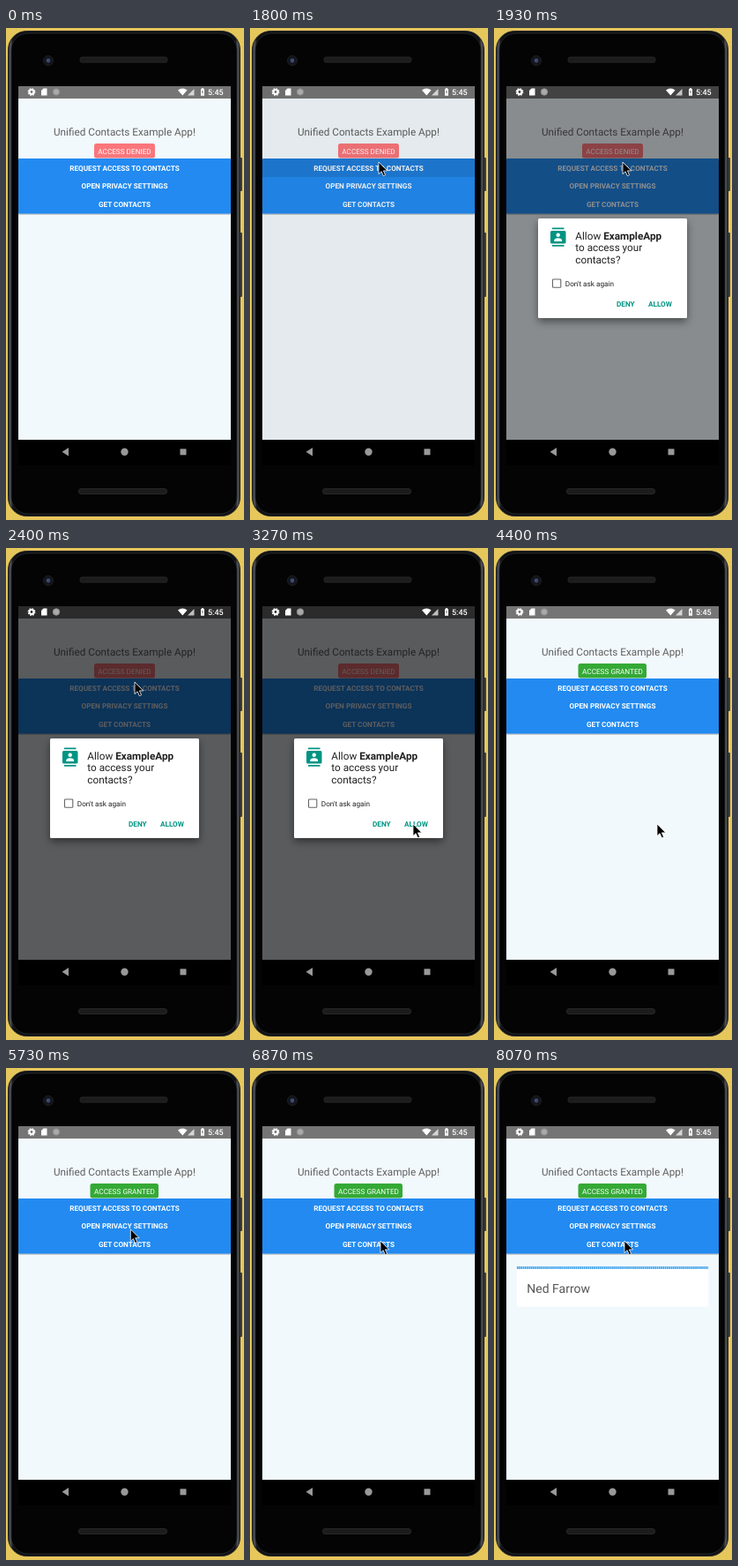
Animation of 270x558 px, one loop 8.73 s. Source, as an HTML page:

```html
<!DOCTYPE html>
<html lang="en">
<head>
<meta charset="utf-8">
<title>Unified Contacts Example App</title>
<style>
  html, body { margin: 0; width: 100%; height: 100%; overflow: hidden; background: #e6c75b; }
  svg { display: block; width: 100vw; height: 100vh; font: 8.2px Roboto, sans-serif; text-rendering: geometricPrecision; }
  .mid { text-anchor: middle; }
  .bold { font-weight: 700; }
  .big { font-size: 11.75px; }
  .white { fill: #fff; }
  .teal { fill: #009482; }
</style>
</head>
<body>
<svg viewBox="0 0 270 558" preserveAspectRatio="none">
  <defs>
    <linearGradient id="rim">
      <stop offset="0" stop-color="#1d1f22"/>
      <stop offset=".01" stop-color="#565a60"/>
      <stop offset=".02" stop-color="#111214"/>
      <stop offset=".98" stop-color="#111214"/>
      <stop offset=".99" stop-color="#565a60"/>
      <stop offset="1" stop-color="#1d1f22"/>
    </linearGradient>
    <filter id="soft" x="-20%" y="-20%" width="140%" height="150%">
      <feDropShadow dx="0" dy="4" stdDeviation="5" flood-opacity=".45"/>
    </filter>
    <filter id="low" x="-5%" y="-10%" width="110%" height="130%">
      <feDropShadow dx="0" dy="1" stdDeviation=".7" flood-opacity=".35"/>
    </filter>
  </defs>

  <!-- phone -->
  <rect width="270" height="558" fill="#e6c75b"/>
  <g fill="#3c4148">
    <rect x="264" y="147" width="4" height="38" rx="1"/>
    <rect x="264" y="232" width="4" height="73" rx="1"/>
  </g>
  <rect x="2.500" y="3.500" width="263" height="550" rx="21" fill="url(#rim)" stroke="#202226"/>
  <rect x="6" y="6" width="256" height="545" rx="19" fill="#040405" stroke="#2c2f34" stroke-width=".7"/>
  <g fill="#1c1c1d" stroke="#303032" stroke-width=".7">
    <rect x="84" y="33" width="99" height="6" rx="2.500"/>
    <rect x="82.500" y="522.500" width="100" height="6" rx="2.500"/>
  </g>
  <circle cx="48" cy="37" r="5.500" fill="#121419" stroke="#1d1f24"/>
  <circle cx="48" cy="37" r="2.400" fill="#3c4a70"/>
  <rect x="14" y="66" width="241" height="430" fill="#000"/>
  <g fill="#999">
    <path d="M71 476v9.400l-7.500-4.700z"/>
    <circle cx="134.500" cy="480.700" r="4.200"/>
    <rect x="197.500" y="477.300" width="7" height="7"/>
  </g>

  <!-- app -->
  <rect x="14" y="66" width="241" height="401" fill="#f2f9fc"/>
  <rect x="14" y="66" width="241" height="14" fill="#757575"/>
  <text x="134.500" y="121.600" class="mid big" fill="#606060">Unified Contacts Example App!</text>
  <g id="denied">
    <rect x="100" y="131" width="69" height="16.500" rx="2.500" fill="#fa767b"/>
    <text x="134.500" y="142.500" class="mid white">ACCESS DENIED</text>
  </g>
  <g id="granted">
    <rect x="95.500" y="131" width="77.500" height="16.500" rx="2.500" fill="#35a936"/>
    <text x="134.500" y="142.500" class="mid white">ACCESS GRANTED</text>
  </g>
  <rect x="14" y="148" width="241" height="62.500" rx="1" fill="#208af0" filter="url(#low)"/>
  <rect id="pressAsk" x="14" y="148" width="241" height="21"/>
  <rect id="pressGet" x="14" y="190" width="241" height="20.500"/>
  <g class="mid bold white">
    <text x="134.500" y="161.500">REQUEST ACCESS TO CONTACTS</text>
    <text x="134.500" y="182.300">OPEN PRIVACY SETTINGS</text>
    <text x="134.500" y="203.200">GET CONTACTS</text>
  </g>
  <g id="card">
    <rect x="26" y="225" width="217" height="45.500" fill="#fff"/>
    <path d="M26 226.500h217" stroke="#b5dcf6" stroke-width="3"/>
    <path d="M26 226.500h217" stroke="#45a5ea" stroke-width="3" stroke-dasharray="1.400 .9"/>
    <text x="37.300" y="255" font-size="14" fill="#555">Ned Farrow</text>
  </g>

  <rect id="dim" x="14" y="66" width="241" height="401"/>

  <!-- status bar -->
  <g class="white">
    <circle cx="29" cy="72.500" r="2.400" fill="none" stroke="#fff" stroke-width="2"/>
    <circle cx="29" cy="72.500" r="3.800" fill="none" stroke="#fff" stroke-width="1.200" stroke-dasharray="1.700 1.284"/>
    <path d="M42.500 68.500H46.500V76.500H40V71z"/>
    <circle cx="57" cy="72.500" r="3.700" fill="#aaa" stroke="#8c8c8c"/>
    <path d="M195 70.500q5.300-4.200 10.600 0l-5.300 6z"/>
    <path d="M213.500 69v7.500H206z" opacity=".7"/>
    <path d="M221 69h1v-1h2v1h1v7.800h-4z"/>
    <path d="M223.300 70l-1.500 3h1l-.3 2.500 1.600-3.200h-1z" fill="#757575"/>
    <text x="229" y="75.800" font-size="9" font-weight="500">5:45</text>
  </g>

  <!-- permission dialog -->
  <g id="dialog">
    <rect x="50" y="216" width="169" height="113" rx="1.500" fill="#fff" filter="url(#soft)"/>
    <g class="teal">
      <path d="M66 226.500h13.500v1.800H66zM66 246h13.500v1.800H66z"/>
      <rect x="64" y="230" width="17.500" height="14.500" rx="1.500"/>
    </g>
    <g class="white">
      <circle cx="72.700" cy="234.700" r="2.200"/>
      <path d="M68.300 242v-1.200q0-2.500 4.400-2.500t4.400 2.500v1.200z"/>
    </g>
    <g fill="#212121">
      <g class="big">
        <text x="92.300" y="239.500">Allow <tspan class="bold">ExampleApp</tspan></text>
        <text x="92.300" y="253.200">to access your</text>
        <text x="92.300" y="266.900">contacts?</text>
      </g>
      <text x="80.800" y="292.500">Don't ask again</text>
    </g>
    <rect x="66.500" y="285" width="9.300" height="9.300" rx=".8" fill="none" stroke="#666" stroke-width="1.100"/>
    <rect id="pressAllow" x="169" y="303" width="40" height="20" rx="1"/>
    <g class="bold teal">
      <text x="139" y="316">DENY</text>
      <text x="175" y="316">ALLOW</text>
    </g>
  </g>

  <path id="cursor" d="M0 0V13.600l3.100-2.900 2.200 5 2.300-1-2.200-4.800H9.800z" stroke="#fff" stroke-width=".8"/>
</svg>
<script>
  const LOOP = 8730, FPS = 15;
  const ENTER = 470, ASK = 1730, OPEN = 1800, CLOSE = 4133, GRANT = 4390, GET = 7330, LIST = 7530;

  const moves = [
    { from: ENTER, to: 1000, x: 146, y: 152 },
    { from: 2467, to: 3267, x: 185, y: 313, bend: 32 },
    { from: 5000, to: 5933, x: 140, y: 179 },
    { from: 6400, to: 6867, x: 148, y: 196 }
  ];

  const $ = id => document.getElementById(id);
  const ramp = (t, from, to) => Math.min(1, Math.max(0, (t - from) / (to - from)));
  const easeOut = p => 1 - (1 - p) ** 2.3;
  const press = (t, from, hold, fade) => .1 * ramp(t, from - 60, from + 60) * (1 - ramp(t, from + hold, from + hold + fade));

  // each move glides on from where the one before ended
  function pointer(t) {
    let x = 244, y = 203;
    for (const m of moves) {
      const p = easeOut(ramp(t, m.from, m.to));
      x += (m.x - x) * p + (m.bend || 0) * 4 * p * (1 - p);
      y += (m.y - y) * p;
    }
    return `translate(${x} ${y})`;
  }

  function draw(ms) {
    const t = Math.floor((ms % LOOP + 4) * FPS / 1000) * 1000 / FPS;
    const leave = ramp(t, CLOSE, CLOSE + 210);
    const opacity = {
      denied: t < GRANT,
      granted: t >= GRANT,
      pressAsk: press(t, ASK, 70, 130),
      pressAllow: press(t, CLOSE - 70, 70, 70),
      pressGet: press(t, GET, 270, 460),
      card: t >= LIST,
      dim: .63 * (ramp(t, OPEN - 20, OPEN + 200) - ramp(t, CLOSE, GRANT)),
      dialog: ramp(t, OPEN, OPEN + 110) * (1 - leave) ** 3,
      cursor: t >= ENTER - 10
    };
    for (const id in opacity) $(id).setAttribute('opacity', +opacity[id]);
    $('dialog').setAttribute('transform', `translate(0 ${7 * leave})`);
    $('cursor').setAttribute('transform', pointer(t));
  }

  let start;
  function tick(now) {
    start ??= now;
    draw(now - start);
    requestAnimationFrame(tick);
  }
  draw(0);
  requestAnimationFrame(tick);
</script>
</body>
</html>
```
